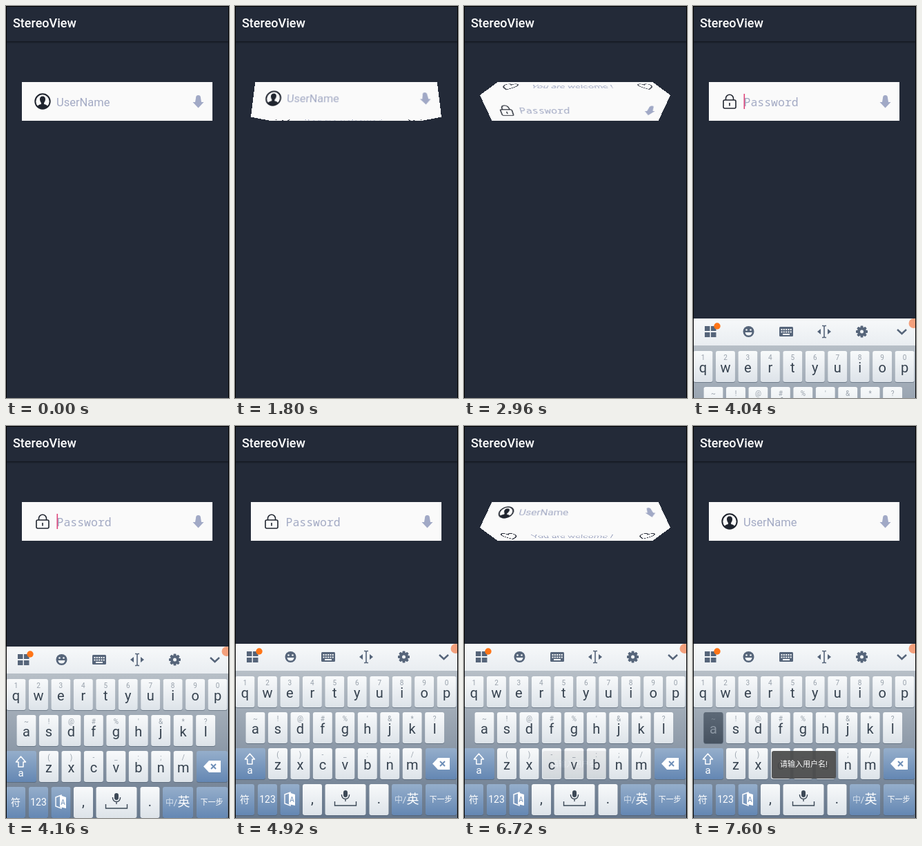
An HTML page for the animation above (8 s loop, 323 by 567 pixels).

```html
<!DOCTYPE html>
<html lang="en">
<head>
<meta charset="utf-8">
<title>StereoView</title>
<style>
  html, body { margin: 0; width: 100%; height: 100%; overflow: hidden; background: #232a38; }
  #stage { position: relative; width: 323px; height: 567px; overflow: hidden; background: #232a38;
    font-family: Roboto, "Noto Sans CJK SC", "Noto Sans CJK", sans-serif; }
  #stage > * { position: absolute; }
  header { left: 0; top: 0; width: 323px; height: 51px; background: #232a38;
    box-shadow: 0 1px 3px rgba(0, 0, 0, .6); }
  header span { position: absolute; left: 10px; top: 14px; font: 500 18px/21px Roboto, sans-serif; color: #fff; }
  #panel { left: 22.5px; top: 110px; width: 276px; height: 56px; overflow: hidden; }
  .page { position: absolute; left: 0; top: 0; width: 276px; height: 56px; background: #fafafa; }
  .page text { font-size: 16.5px; fill: #a3aac4; }
  #keys { left: 0; top: 315px; }
  #keys text { text-anchor: middle; }
  #toast { left: 114px; top: 470px; width: 93px; height: 40px; border-radius: 3px; background: #4a4a4a;
    color: #fff; font-size: 11px; line-height: 40px; text-align: center; white-space: nowrap; }
  #frame { inset: 0; border: 1px solid #000; border-bottom: 0; }
</style>
</head>
<body>
<div id="stage">
  <header><span>StereoView</span></header>
  <div id="panel"></div>
  <svg id="keys" width="323" height="252" viewBox="0 315 323 252"></svg>
  <div id="toast">请输入用户名!</div>
  <div id="frame"></div>
</div>
<script>
const $ = id => document.getElementById(id);
const clamp = v => Math.max(0, Math.min(1, v));
const easeOut = v => 1 - (1 - clamp(v)) ** 2;

// Pages of the rolling panel, listed from top to bottom
const arrow = `<path fill="#a1a9c6" d="M274.5 133Q274.5 129 278 129T281.5 133L282.5 139H286L278 147.5L270 139H273.5Z"/>`;
const heart = (x, y, s) => `<path transform="translate(${x} ${y}) scale(${s})" fill="none" stroke="#252a36"
  stroke-width="1.7" stroke-linejoin="round"
  d="M0 10.3C-5 6-11.3 1.5-11.3-4C-11.3-11.5-2.5-12.5 0-6C2.5-12.5 11.3-11.5 11.3-4C11.3 1.5 5 6 0 10.3Z"/>`;
const person = `<circle cx="52.5" cy="138" r="10.7" fill="none" stroke="#20252f" stroke-width="2"/>
  <path fill="#20252f" d="M52.5 130.5C55.5 130.5 56.8 132.5 56.5 135.5Q56 138.8 54.6 140V142Q59 143 60 145.2
  A10 10 0 0 1 45 145.2Q46 143 50.4 142V140Q49 138.8 48.5 135.5C48.2 132.5 49.5 130.5 52.5 130.5Z"/>`;
const lock = `<g fill="none" stroke="#20252f" stroke-width="1.6"><rect x="43.5" y="136" width="18" height="12" rx="2"/>
  <path d="M47 136V133.5A5.5 5.2 0 0 1 58 133.5V136M52.5 140V144.5"/></g>`;
const pages = [
  person + `<text x="72.5" y="144.5">UserName</text>` + arrow,
  `<g id="hello">${heart(52.5, 138.5, 1)}<text x="89" y="144.5">You are welcome !</text>${heart(277.5, 138, .95)}</g>`,
  lock + `<text x="73" y="144.5" style="font-family:'Noto Sans Mono',monospace">Password</text>` + arrow +
  `<rect id="caret" x="73" y="127" width="1.6" height="22" fill="#e0457b"/>`
].map(body => {
  const page = document.createElement("div");
  page.className = "page";
  page.innerHTML = `<svg width="276" height="56" viewBox="22.5 110 276 56">${body}</svg>`;
  return $("panel").appendChild(page);
});

// Keyboard
const box = (x, y, w, fill, extra = "") =>
  `<rect x="${x}" y="${y + 1}" width="${w}" height="45" rx="3" fill="#4b5a6c" opacity=".6"/>
   <rect x="${x}" y="${y}" width="${w}" height="45" rx="3" fill="url(#${fill})" ${extra}/>`;
const label = (x, y, size, fill, s) => `<text x="${x}" y="${y}" font-size="${size}" fill="${fill}">${s}</text>`;
const key = (x, y, s, hint) => `<g id="key-${s}">${box(x, y, 28, "light")}
  ${label(x + 14, y + 12.5, 10, "#98a1ab", hint.replace("&", "&amp;"))}${label(x + 14, y + 31, 20, "#36424f", s)}</g>`;
const row = (x, y, letters, hints) =>
  [...letters].map((s, i) => key(x + 32.45 * i, y, s, hints[i])).join("");
const ramp = (id, a, b) => `<linearGradient id="${id}" x2="0" y2="1"><stop stop-color="${a}"/>
  <stop offset="1" stop-color="${b}"/></linearGradient>`;
const ink = "#56657a";
const teeth = [0, 45, 90, 135].map(a =>
  `<rect x="242.5" y="325.5" width="4" height="17" rx="1" transform="rotate(${a} 244.5 334)"/>`).join("");
const dots = [0, 1, 2, 3, 4, 5, 6, 7, 8, 9].map(i =>
  `<rect x="${127.5 + i % 5 * 3.3}" y="${i < 5 ? 330 : 333.5}" width="2" height="2"/>`).join("");

$("keys").innerHTML = `<defs>${ramp("bar", "#f7f9fa", "#e9edf1")}${ramp("bed", "#b7bfc7", "#65768b")}
  ${ramp("light", "#f8fafb", "#dde3e9")}${ramp("blue", "#95aecb", "#6487b3")}${ramp("down", "#5d6977", "#465260")}</defs>
<rect y="315" width="323" height="39" fill="url(#bar)"/>
<rect y="354" width="323" height="213" fill="url(#bed)"/>
<g fill="${ink}">
  <path d="M17 326h7.5v7h-7.5zM17 335h7.5v7h-7.5zM26 335h7.5v7h-7.5zM26 326h7.5v7h-7.5z"/>
  <circle cx="80.5" cy="334" r="8"/>
  <rect x="125" y="327" width="20" height="14" rx="1.5"/>
  <path d="M180 334l5-4v8zM200 334l-5-4v8z"/>
  ${teeth}<circle cx="244.5" cy="334" r="6.5"/>
</g>
<g fill="#f1f4f6">
  <circle cx="77.5" cy="331.5" r="1.3"/><circle cx="83.5" cy="331.5" r="1.3"/>
  <path d="M75.5 335h10a5 4.5 0 0 1-10 0z"/>
  ${dots}<rect x="130" y="337" width="10" height="2"/><circle cx="244.5" cy="334" r="2.5"/>
</g>
<path d="M187 325.5h2l1 1 1-1h2M187 342.5h2l1-1 1 1h2M190 326.5v15" fill="none" stroke="${ink}" stroke-width="1.6"/>
<path d="M296 331l6.5 6 6.5-6" fill="none" stroke="${ink}" stroke-width="2.4"/>
<circle cx="35" cy="326" r="4.7" fill="#ff7517"/>
<circle cx="319.5" cy="322" r="7" fill="#f4a07c"/>
${row(.5, 362, "qwertyuiop", "1234567890")}
${row(15.5, 414, "asdfghjkl", "~!@#%'&*?")}
${row(48, 466, "zxcvbnm", "()-_:;/")}
${box(0, 466, 44, "blue")}${box(276, 466, 45, "blue")}
<path d="M21.5 474l7 8h-3.5v7h-7v-7h-3.5z" fill="none" stroke="#fff" stroke-width="1.5" stroke-linejoin="round"/>
${label(21.5, 503, 15, "#fff", "a")}
<path d="M286 488.5l8-8.5h17v17h-17z" fill="#fff"/>
<path d="M297 485l7 7m0-7l-7 7" stroke="#6f8fb8" stroke-width="2"/>
${box(0, 518, 28, "blue")}${label(14, 545, 14, "#fff", "符")}
${box(33, 518, 28, "blue")}${label(47, 544.5, 14, "#fff", "123")}
${box(65.5, 518, 28, "blue")}
<path d="M72 533l8-3v19l-8-3z" fill="none" stroke="#fff" stroke-width="1.4"/>
<path d="M78 530l9 3v16l-9-2z" fill="#fff"/>${label(82.5, 544, 10, "#6f8fb8", "A")}
${box(98, 518, 28, "light")}${label(112, 546, 20, "#36424f", ",")}
${box(130.5, 518, 59, "light")}
<rect x="157" y="527" width="6" height="10" rx="3" fill="#3d4957"/>
<path d="M154.5 533v1a5.5 5.5 0 0 0 11 0v-1M160 540v3M144.500 543v6h31v-6" fill="none" stroke="#3d4957" stroke-width="1.4"/>
${box(194.5, 518, 28, "light")}${label(208.5, 546, 20, "#36424f", ".")}
${box(227, 518, 44, "blue")}${label(237, 545, 12, "#d3deeb", "中")}${label(245.5, 545, 13, "#e2eaf3", "/")}
${label(257.5, 546, 18, "#fff", "英")}
${box(276, 518, 45, "blue")}${label(298, 544, 11, "#fff", "下一步")}`;

const keyA = $("key-a").children;

// Each roll: start, duration, signed number of pages
const rolls = [[1780, 420, 1], [2600, 864, 1], [5320, 400, -1], [6520, 480, -1]];

function draw(t) {
  const pos = rolls.reduce((p, [start, len, step]) => p + step * easeOut((t - start) / len), 0);
  pages.forEach((page, i) => {
    const o = i - pos;
    page.style.visibility = Math.abs(o) < .999 ? "visible" : "hidden";
    page.style.transformOrigin = o < 0 ? "50% 100%" : "50% 0";
    page.style.transform = Math.abs(o) < .001 ? "none"
      : `translateY(${56 * o}px) perspective(172px) rotateX(${-90 * o}deg)`;
  });
  const drop = 5.5 * (1 - clamp((t - 2280) / 320));
  $("hello").setAttribute("transform", `translate(0 ${drop})`);
  $("caret").style.opacity = t >= 4040 && t < 4760 ? 1 : 0;

  const hidden = t < 4040 ? 252 : Math.round(252 * (1 - easeOut((t - 3990) / 195)));
  $("keys").style.transform = `translateY(${hidden}px)`;
  const down = t >= 7600;
  keyA[1].setAttribute("fill", down ? "url(#down)" : "url(#light)");
  keyA[2].setAttribute("fill", down ? "#7d8894" : "#98a1ab");
  keyA[3].setAttribute("fill", down ? "#8b96a2" : "#36424f");
  $("toast").style.opacity = .93 * clamp((t - 6680) / 480);
}

function tick() {
  draw(performance.now() % 8000);
  requestAnimationFrame(tick);
}
tick();
</script>
</body>
</html>
```
